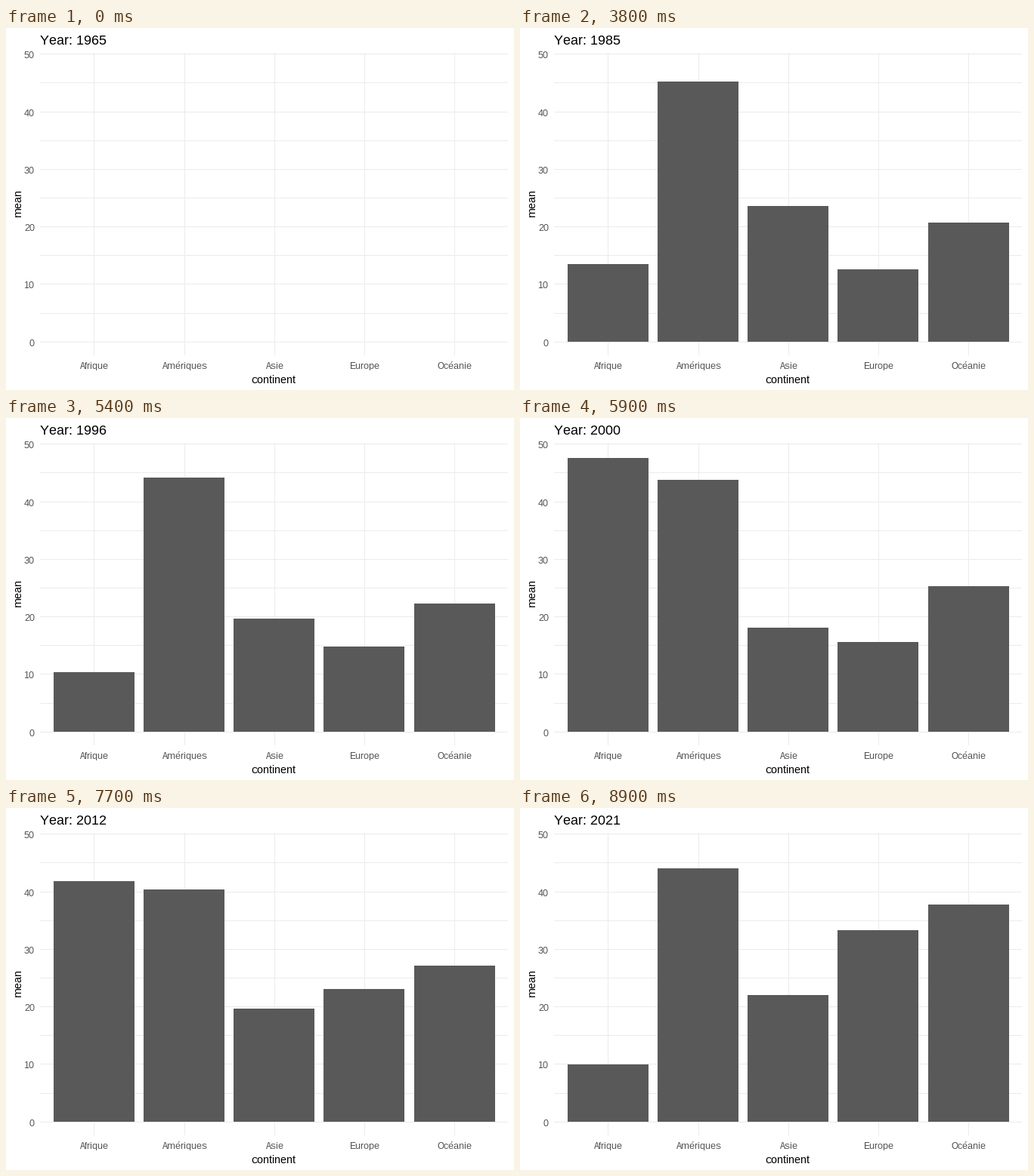
Animation, 672 px wide and 480 px high, one loop 10 s. Source, as a matplotlib script:

```python
import numpy as np
import matplotlib.pyplot as plt
from matplotlib.animation import FuncAnimation
from matplotlib.patches import Rectangle

plt.rcParams.update({
    "toolbar": "None",
    "font.family": "Liberation Sans",
    "text.hinting": "native",
    "text.hinting_factor": 1,
    "text.kerning_factor": 6,
})

W, H, DPI = 672, 480, 96
FRAMES, PAUSE, STEPS = 100, 10, 79
FIRST, LAST = 1965, 2021

LEFT, RIGHT, TOP, BOTTOM = 45, 664, 33, 434
ZERO, UNIT = 416.2, 7.629      # pixel row of 0, pixels per unit
X0, DX = 116.4, 119.15         # first category, spacing
BASE, BAR_W = 416, 107

GRID, BAR, TICK = "#ebebeb", "#595959", "#4d4d4d"


def trend(early, late):
    """Straight line until 1999, then the curve `late` in years since 2000."""
    value, slope = early
    return lambda year: (value + slope * (year - 1991) if year < 2000
                         else late(year - 2000))


def africa(t):
    return 41.8 + 5.8 * np.exp(-t / 2) if t < 20 else 9.2 + 0.8 * (t - 20)


def americas(t):
    return 43.9 + 0.03 * t - 3.875 * np.exp(-((t - 12.5) / 5.96) ** 2)


def asia(t):
    return 18.1 + 0.0163 * t ** 1.8


def europe(t):
    return 15.6 + 0.085 * t + 1.23 * max(t - 7, 0) ** 0.97


def oceania(t):
    return 25.3 - 0.696 * t + 0.0756 * t ** 2 - 0.00067 * t ** 3


TRENDS = {
    "Afrique": trend((11.8, -0.28), africa),
    "Amériques": trend((44.7, -0.09), americas),
    "Asie": trend((21.5, -0.35), asia),
    "Europe": trend((13.8, 0.2), europe),
    "Océanie": trend((21.6, 0.15), oceania),
}

# Each year lands on a whole step; heights are linear in between
YEARS = range(1985, LAST + 1)
KEYS = [round((year - FIRST) / (LAST - FIRST) * STEPS) for year in YEARS]

fig = plt.figure(figsize=(W / DPI, H / DPI), dpi=DPI, facecolor="white")
ax = fig.add_axes([0, 0, 1, 1])
ax.set_xlim(0, W)
ax.set_ylim(H, 0)
ax.axis("off")


def box(x, y, w, h, color, z=1):
    return ax.add_patch(Rectangle((x, y), w, h, fc=color, lw=0,
                                  antialiased=False, zorder=z))


def label(x, y, text, px, color="black", **kw):
    return ax.text(x, y, text, fontsize=px * 72 / DPI, color=color,
                   va="baseline", **kw)


for value in range(0, 51, 5):
    row = int(ZERO - value * UNIT)
    box(LEFT, row, RIGHT - LEFT, 1, GRID)
    if value % 10 == 0:
        label(38, row + 6, str(value), 12, TICK, ha="right")

bars = []
for k, (name, mean) in enumerate(TRENDS.items()):
    x = X0 + k * DX
    box(round(x), TOP, 1, BOTTOM - TOP, GRID)
    label(round(x) + 0.5, 452, name, 12, TICK, ha="center")
    bar = box(round(x - BAR_W / 2), BASE, BAR_W, 0, BAR, z=2)
    bars.append((bar, [mean(year) for year in YEARS]))

label(353.5, 471, "continent", 15, ha="center")
label(20, 231, "mean", 15, ha="center", rotation=90, rotation_mode="anchor")
title = label(LEFT, 22, "", 18)


def update(frame):
    step = min(max(frame - PAUSE, 0), STEPS)
    title.set_text(f"Year: {round(FIRST + (LAST - FIRST) * step / STEPS)}")
    for bar, means in bars:
        top = round(ZERO - np.interp(step, KEYS, means) * UNIT)
        bar.set_visible(step >= KEYS[0])
        bar.set_y(top)
        bar.set_height(BASE - top)
    return [title]


anim = FuncAnimation(fig, update, frames=FRAMES, interval=100,
                     init_func=lambda: update(0), repeat=True, repeat_delay=0)
plt.show()
```
